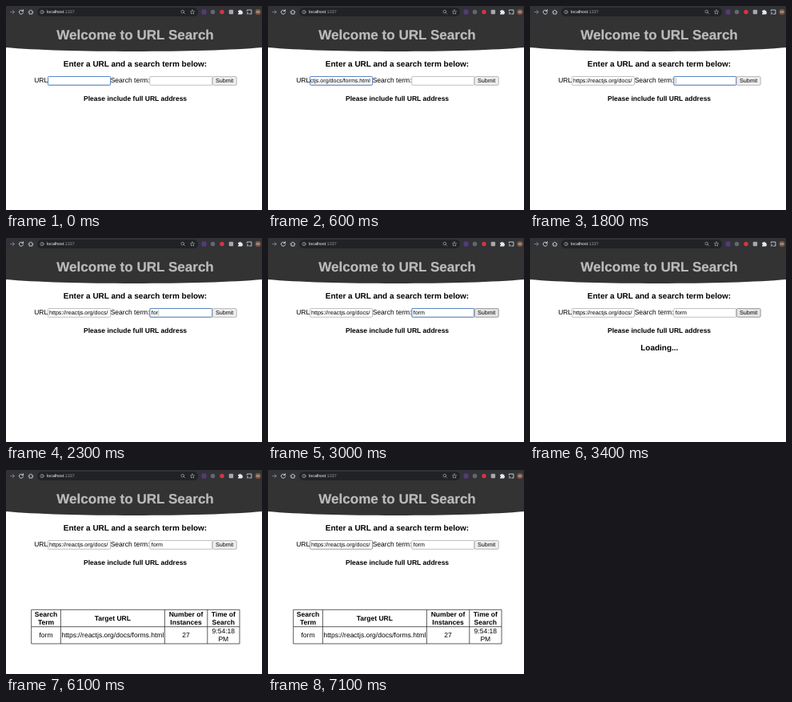
An HTML page that plays this animation: 320 by 256 pixels, repeating every 8 s.

```html
<!DOCTYPE html>
<html lang="en">
<head>
<meta charset="utf-8">
<title>URL Search</title>
<style>
html, body { margin: 0; width: 100%; height: 100%; overflow: hidden; background: #fff; }
svg { display: block; width: 100vw; height: 100vh; }
text { font-family: "Liberation Sans", Arial, sans-serif; font-size: 8.53px; text-rendering: geometricPrecision; white-space: pre; }
.b { font-weight: bold; }
.h1 { font-size: 17.07px; fill: #bbb; stroke: #bbb; stroke-width: .2; }
.h3 { font-size: 9.98px; }
.field { font-size: 7.11px; }
.mid { text-anchor: middle; }
.end { text-anchor: end; }
.box { fill: #fff; stroke: #b0b0b0; stroke-width: .8; }
.ring { fill: none; stroke: #5b86c6; stroke-width: 1; }
.btn { fill: #efefef; stroke: #a8a8a8; stroke-width: .8; }
.caret { fill: #888; }
.table { fill: none; stroke: #333; stroke-width: .8; }
.icon { fill: none; stroke: #d4d4d6; stroke-width: .9; stroke-linecap: round; stroke-linejoin: round; }

/* every state switches hard on one 8 s clock */
.t { animation: 8s step-end infinite; }
.urlRing { animation-name: urlRing; }
.pasted { animation-name: pasted; }
.urlCaret { animation-name: urlCaret; }
.urlStart { animation-name: urlStart; }
.urlBox { animation-name: urlBox; }
.termRing { animation-name: termRing; }
.termCaret { animation-name: termCaret, caretStep; }
.k1 { animation-name: k1; }
.k2 { animation-name: k2; }
.k3 { animation-name: k3; }
.k4 { animation-name: k4; }
.submit { animation-name: submit; }
.loading { animation-name: loading; }
.result { animation-name: result; }

@keyframes urlRing { 0% { opacity: 1 } 10%, 100% { opacity: 0 } }
@keyframes pasted { 0%, 10%, 100% { opacity: 0 } 1.25% { opacity: 1 } }
@keyframes urlCaret { 0%, 7.5%, 100% { opacity: 0 } 1.25% { opacity: 1 } }
@keyframes urlStart { 0% { opacity: 0 } 10%, 100% { opacity: 1 } }
@keyframes urlBox { 0% { stroke: #b0b0b0 } 88.75%, 100% { stroke: #858585 } }
@keyframes termRing { 0%, 40%, 100% { opacity: 0 } 10% { opacity: 1 } }
@keyframes termCaret { 0%, 16.25%, 36.25%, 100% { opacity: 0 } 10%, 22.5% { opacity: 1 } }
@keyframes caretStep {
  0% { transform: none }
  25% { transform: translateX(2px) }
  27.5% { transform: translateX(5.9px) }
  28.75% { transform: translateX(8.3px) }
  30%, 100% { transform: translateX(14.2px) }
}
@keyframes k1 { 0% { opacity: 0 } 25%, 100% { opacity: 1 } }
@keyframes k2 { 0% { opacity: 0 } 27.5%, 100% { opacity: 1 } }
@keyframes k3 { 0% { opacity: 0 } 28.75%, 100% { opacity: 1 } }
@keyframes k4 { 0% { opacity: 0 } 30%, 100% { opacity: 1 } }
@keyframes submit {
  0%, 76.25%, 100% { fill: #efefef; stroke: #a8a8a8 }
  37.5%, 42.5% { fill: #e5e5e5; stroke: #858585 }
  40% { fill: #f5f5f5; stroke: #b4b4b4 }
}
@keyframes loading { 0%, 65%, 100% { opacity: 0 } 42.5% { opacity: 1 } }
@keyframes result { 0% { opacity: 0 } 65%, 100% { opacity: 1 } }
</style>
</head>
<body>
<svg viewBox="0 0 320 256">
  <defs>
    <clipPath id="urlClip"><rect x="53.6" y="88" width="75" height="11"/></clipPath>
  </defs>
  <rect width="320" height="256" fill="#fff"/>

  <!-- page header -->
  <path d="M0 10H320V52C250 58.6 70 58.6 0 52z" fill="#333"/>
  <text class="b h1 mid" x="161.5" y="41.7">Welcome to URL Search</text>
  <text class="b h3 mid" x="161.5" y="75.6">Enter a URL and a search term below:</text>

  <!-- browser bar -->
  <rect width="320" height="14" fill="#313236"/>
  <rect x="39" y="2" width="201" height="11" rx="5.5" fill="#212225"/>
  <g class="icon">
    <path d="M5.5 7.5h5M8.3 5.2l2.3 2.3l-2.3 2.3" stroke="#85858a"/>
    <path d="M21.2 6.2a2.6 2.6 0 1 0 .4 2M21.6 4.6v1.9h-1.9"/>
    <path d="M28 7.5l3-2.6l3 2.6M29 7v3h4v-3"/>
    <g stroke-width=".6" stroke="#b4b4b8">
      <circle cx="45" cy="7.5" r="2.2"/>
      <path d="M45 7.4v1.1M45 6.3v.1"/>
      <circle cx="220.7" cy="7" r="1.8"/>
      <path d="M222 8.3l1.6 1.6"/>
      <path d="M233 4.8l.8 1.8l1.9.2l-1.4 1.3l.4 1.9l-1.7-1l-1.7 1l.4-1.9l-1.4-1.3l1.9-.2z"/>
    </g>
  </g>
  <text x="51" y="9.3" fill="#f4f4f4" style="font-size:5.4px">localhost<tspan fill="#9a9ba0">:1337</tspan></text>
  <rect x="244.6" y="4.6" width="5.8" height="5.8" rx="1" fill="#563a78"/>
  <circle cx="258.5" cy="7.5" r="2.8" fill="#66666b"/>
  <circle cx="270" cy="7.5" r="2.7" fill="#d8343c"/>
  <rect x="278.7" y="4.7" width="5.4" height="5.6" rx="1" fill="#a8a8ac"/>
  <path d="M290 5.8h1.6a1 1 0 0 1 2 0h1.6v1.6a1 1 0 0 1 0 2v1.2h-5.2v-1.4a1 1 0 0 0 0-2z" fill="#e8e8ea"/>
  <path class="icon" d="M301.3 6.2v-1.2h5.6v5h-2.2M301.4 8.2a1.8 1.8 0 0 1 1.7 1.8M301.4 10v.1"/>
  <circle cx="315" cy="7.5" r="3.8" fill="#70503f"/>
  <text class="mid" x="315" y="9.2" fill="#eee" style="font-size:4.6px">M</text>

  <!-- form -->
  <text x="35.2" y="96">URL</text>
  <rect class="box t urlBox" x="52.5" y="88.5" width="78" height="10.8" rx="1"/>
  <g clip-path="url(#urlClip)">
    <text class="field end t pasted" x="127.8" y="96.2">https://reactjs.org/docs/forms.html</text>
    <text class="field t urlStart" x="54" y="96.2">https://reactjs.org/docs/</text>
    <rect class="caret t urlCaret" x="128" y="90" width=".6" height="8"/>
  </g>
  <rect class="ring t urlRing" x="52.5" y="88.5" width="78" height="10.8" rx="1"/>

  <text x="130.7" y="96">Search term:</text>
  <rect class="box" x="179.8" y="88.5" width="78" height="10.8" rx="1"/>
  <text class="field t k1" x="181.7" y="96.2">f</text>
  <text class="field t k2" x="183.7" y="96.2">o</text>
  <text class="field t k3" x="187.6" y="96.2">r</text>
  <text class="field t k4" x="190" y="96.2">m</text>
  <rect class="caret t termCaret" x="181.9" y="90" width=".6" height="8"/>
  <rect class="ring t termRing" x="179.8" y="88.5" width="78" height="10.8" rx="1"/>

  <rect class="btn t submit" x="258.2" y="88.6" width="30" height="10.7" rx="1.2"/>
  <text class="field mid" x="273.1" y="96.2">Submit</text>

  <text class="b mid" x="161.6" y="118.6">Please include full URL address</text>
  <text class="b h3 mid t loading" x="161.8" y="141">Loading...</text>

  <!-- result -->
  <g class="t result">
    <path class="table" d="M31.7 175.3H292V218H31.7zM31.7 196.7H292M68.4 175.3V218M198.4 175.3V218M251.8 175.3V218"/>
    <g class="b mid">
      <text x="50" y="184">Search</text>
      <text x="50" y="193.6">Term</text>
      <text x="133.3" y="188.8">Target URL</text>
      <text x="225" y="184">Number of</text>
      <text x="225" y="193.6">Instances</text>
      <text x="271.8" y="184">Time of</text>
      <text x="271.8" y="193.6">Search</text>
    </g>
    <g class="mid">
      <text x="50" y="210.3">form</text>
      <text x="133.4" y="210.3">https://reactjs.org/docs/forms.html</text>
      <text x="225" y="210.3">27</text>
      <text x="271.8" y="205.4">9:54:18</text>
      <text x="271.8" y="215.2">PM</text>
    </g>
  </g>
</svg>
</body>
</html>
```
